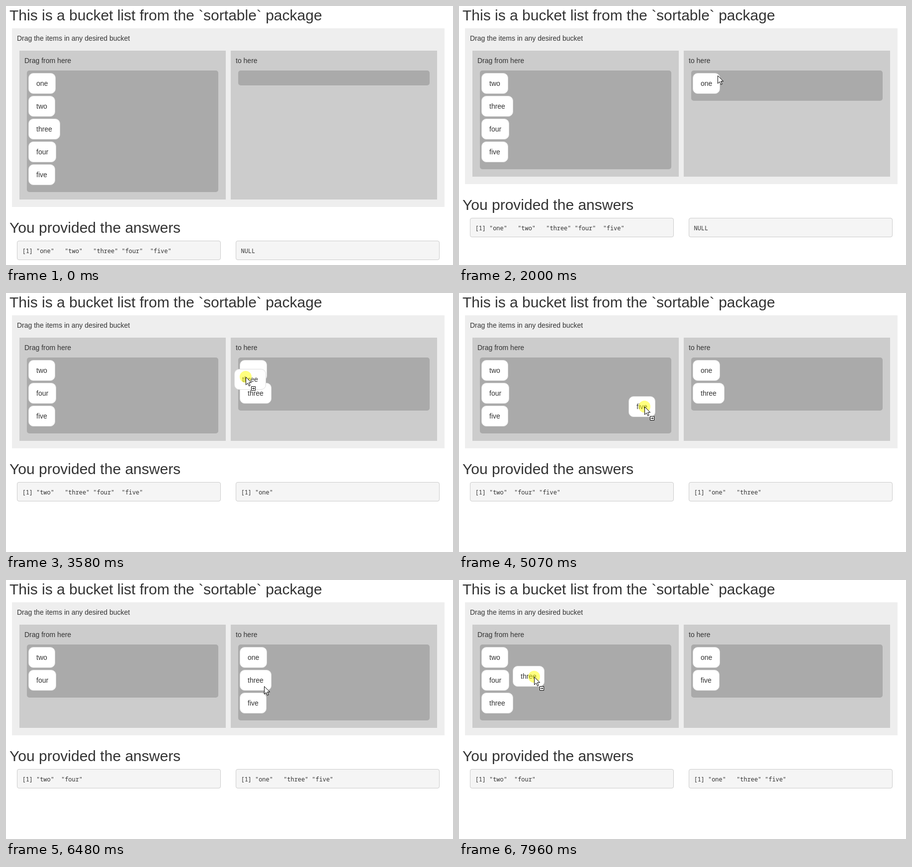
Recreate the animation shown at these times as an HTML page. Size 899x522 px, loop 8000 ms.

```html
<!DOCTYPE html>
<html lang="en">
<head>
<meta charset="utf-8">
<title>Bucket list</title>
<style>
  html, body { margin: 0; width: 100%; height: 100%; overflow: hidden; background: #fff; }
  #stage { position: relative; width: 899px; height: 522px; overflow: hidden;
    font: 14px/20px "Liberation Sans", Arial, sans-serif; color: #333; }
  #stage div, #stage svg { position: absolute; box-sizing: border-box; white-space: pre; }
  #stage .title { left: 7px; font-size: 30px; line-height: 33px; }
  .group { left: 12px; top: 45px; width: 870px; background: #eee; }
  .column { top: 90px; width: 415px; background: #ccc; }
  .list { top: 130px; width: 385px; background: #aaa; border-radius: 5px; }
  .item { left: 0; top: 0; height: 42px; padding: 10px 15px; background: #fff;
    border: 1px solid #ddd; border-radius: 10px; }
  .answer { width: 410px; height: 39px; padding: 9.5px; background: #f5f5f5;
    border: 1px solid #ccc; border-radius: 4px;
    font: 11.92px/18.57px "Noto Sans Mono", "DejaVu Sans Mono", monospace; }
  .halo { left: -12px; top: -12px; width: 24px; height: 24px; border-radius: 50%;
    background: rgba(255, 255, 0, .5); }
  #pointer { left: 0; top: 0; }
  #pointer svg { left: 0; top: 0; overflow: visible; }
</style>
</head>
<body>
<div id="stage"></div>
<script>
const LOOP = 8000, PITCH = 46;
const WORDS = ["one", "two", "three", "four", "five"];
const stage = document.getElementById("stage");

const EASE = {
  in: k => k * k,
  out: k => k * (2 - k),
  both: k => k * k * (3 - 2 * k)
};

// Pointer moves: start, end, steps, target x and y, easing
const ENTRY = [732, 492];
const MOVES = [
  [100, 732, 8, 105, 142, "both"],
  [732, 890, 2, 83, 154, "out"],
  [900, 980, 1, 82, 154, "out"],
  [1120, 1532, 5, 446, 145, "in"],
  [1532, 1780, 3, 520, 140, "out"],
  [1930, 2570, 8, 61, 197, "both"],
  [2720, 2880, 2, 68, 197, "both"],
  [3030, 3574, 7, 482, 169, "both"],
  [3574, 3730, 2, 490, 169, "out"],
  [3940, 4580, 8, 77, 248, "both"],
  [4830, 5070, 3, 373, 229, "in"],
  [5070, 5550, 6, 520, 219, "out"],
  [5670, 5870, 3, 538, 261, "both"],
  [6000, 6100, 1, 540, 261, "out"],
  [6162, 6475, 4, 519, 214, "both"],
  [6475, 6710, 3, 513, 203, "out"],
  [7229, 7960, 9, 151, 195, "both"]
];

function tipAt(t) {
  const last = MOVES.findLastIndex(m => m[0] <= t);
  if (last < 0) return null;
  const [start, end, steps, x, y, ease] = MOVES[last];
  const [x0, y0] = last ? MOVES[last - 1].slice(3, 5) : ENTRY;
  const step = Math.min(steps, Math.floor((t - start) / (end - start) * steps + 1e-6));
  const k = EASE[ease](step / steps);
  return [Math.round(x0 + (x - x0) * k), Math.round(y0 + (y - y0) * k)];
}

const DRAGS = [
  { word: "one", from: 0, press: 1120, release: 1930, refresh: 2010 },
  { word: "three", from: 0, press: 3030, release: 3940, refresh: 4020 },
  { word: "five", from: 0, press: 4830, release: 5670, refresh: 5737 },
  { word: "three", from: 1, press: 7030, release: Infinity, refresh: Infinity }
];

function moveTo(sides, word, side) {
  const rest = sides.map(s => s.filter(w => w !== word));
  rest[side].push(word);
  return rest;
}

function sidesAt(t, key, tip) {
  let sides = [WORDS, []];
  for (const d of DRAGS) {
    if (t >= d[key]) sides = moveTo(sides, d.word, 1 - d.from);
    else if (tip && t >= d.press) {
      const x = tip[0];
      if (d.from) { if (x < 427) sides = moveTo(sides, d.word, 0); }
      else if (x >= 467) sides = moveTo(sides, d.word, 1);
      else if (x > 108) sides = moveTo(sides, d.word, 0);
    }
  }
  return sides;
}

const corner = (side, row) => [45 + 425 * side, 135 + PITCH * row];
for (const d of DRAGS) {
  d.grab = tipAt(d.press);
  d.home = corner(d.from, sidesAt(d.press, "release")[d.from].indexOf(d.word));
}

// Same padding as a printed R character vector
function printed(words) {
  if (!words.length) return "NULL";
  const width = Math.max(...words.map(w => w.length)) + 2;
  return "[1] " + words.map(w => `"${w}"`.padEnd(width)).join(" ");
}

function add(cls, text = "", left, top, parent = stage) {
  const el = document.createElement("div");
  el.className = cls;
  el.textContent = text;
  if (left !== undefined) el.style.left = left + "px";
  if (top !== undefined) el.style.top = top + "px";
  return parent.appendChild(el);
}
const at = (el, x, y) => { el.style.transform = `translate(${x}px, ${y}px)`; };
const show = (el, on) => { el.style.display = on ? "" : "none"; };

add("title", "This is a bucket list from the `sortable` package", 7, 2);
const group = add("group");
const columns = [27, 452].map(x => add("column", "", x));
const lists = [42, 467].map(x => add("list", "", x));
add("", "Drag the items in any desired bucket", 22, 55);
add("", "Drag from here", 37, 100);
add("", "to here", 462, 100);
const heading = add("title", "You provided the answers");
const answers = [22, 462].map(x => add("answer", "", x));
const items = Object.fromEntries(WORDS.map(w => [w, add("item", w)]));
const dragged = add("item");

const pointer = add("");
pointer.id = "pointer";
const halo = add("halo", "", undefined, undefined, pointer);
const ARROW = '<path d="M.5 .5V16.2L4.1 12.7L6.7 18.5L9.1 17.4L6.6 11.7H11.6Z" fill="#fff" stroke="#000"/>';
const SHAPES = {
  arrow: ARROW,
  move: ARROW + '<path d="M11.5 19.5h8v8h-8z" fill="#fff" stroke="#000"/>' +
    '<path d="M13 23.5h4.5M15.5 21.5l2 2l-2 2" fill="none" stroke="#000"/>',
  text: '<path d="M-1 -7.5H2M3 -7.5H6M2.5 -7V7M-1 7.5H2M3 7.5H6" fill="none" stroke="#000"/>',
  deny: '<g fill="none" stroke="#c8000c" stroke-width="2.2"><circle cx="8" cy="7" r="6.7"/>' +
    '<path d="M3.3 2.3l9.4 9.4"/></g>'
};
const cursors = Object.fromEntries(Object.entries(SHAPES).map(([kind, shape]) => {
  pointer.insertAdjacentHTML("beforeend", `<svg width="22" height="30">${shape}</svg>`);
  return [kind, pointer.lastChild];
}));

function cursorKind([x, y], dragging) {
  if (dragging) return (x >= 42 && x < 427) || x >= 467 ? "move" : "deny";
  return (x < 100 && y > 145) || y > 470 ? "text" : "arrow";
}

function draw(t) {
  const tip = tipAt(t);
  const drag = DRAGS.find(d => t >= d.press && t < d.release);
  const dragging = drag && String(tip) !== String(drag.grab);
  const sides = sidesAt(t, "release", tip);
  const shown = sidesAt(t, "refresh");
  const rows = Math.max(...sides.map(s => s.length));
  const bottom = 175 + PITCH * rows;

  group.style.height = bottom - 45 + "px";
  heading.style.top = bottom + 25 + "px";
  sides.forEach((words, i) => {
    columns[i].style.height = bottom - 105 + "px";
    lists[i].style.height = (words.length ? 15 + PITCH * words.length : 30) + "px";
    words.forEach((w, j) => at(items[w], ...corner(i, j)));
    answers[i].style.top = bottom + 68 + "px";
    answers[i].textContent = printed(shown[i]);
  });

  show(dragged, dragging);
  if (dragging) {
    dragged.textContent = drag.word;
    at(dragged, ...drag.home.map((c, i) => c + tip[i] - drag.grab[i]));
  }
  show(pointer, tip);
  if (!tip) return;
  at(pointer, ...tip);
  show(halo, drag);
  const kind = cursorKind(tip, dragging);
  for (const k in cursors) show(cursors[k], k === kind);
}

const began = performance.now();
function tick() {
  draw((performance.now() - began) % LOOP);
  requestAnimationFrame(tick);
}
tick();
</script>
</body>
</html>
```
